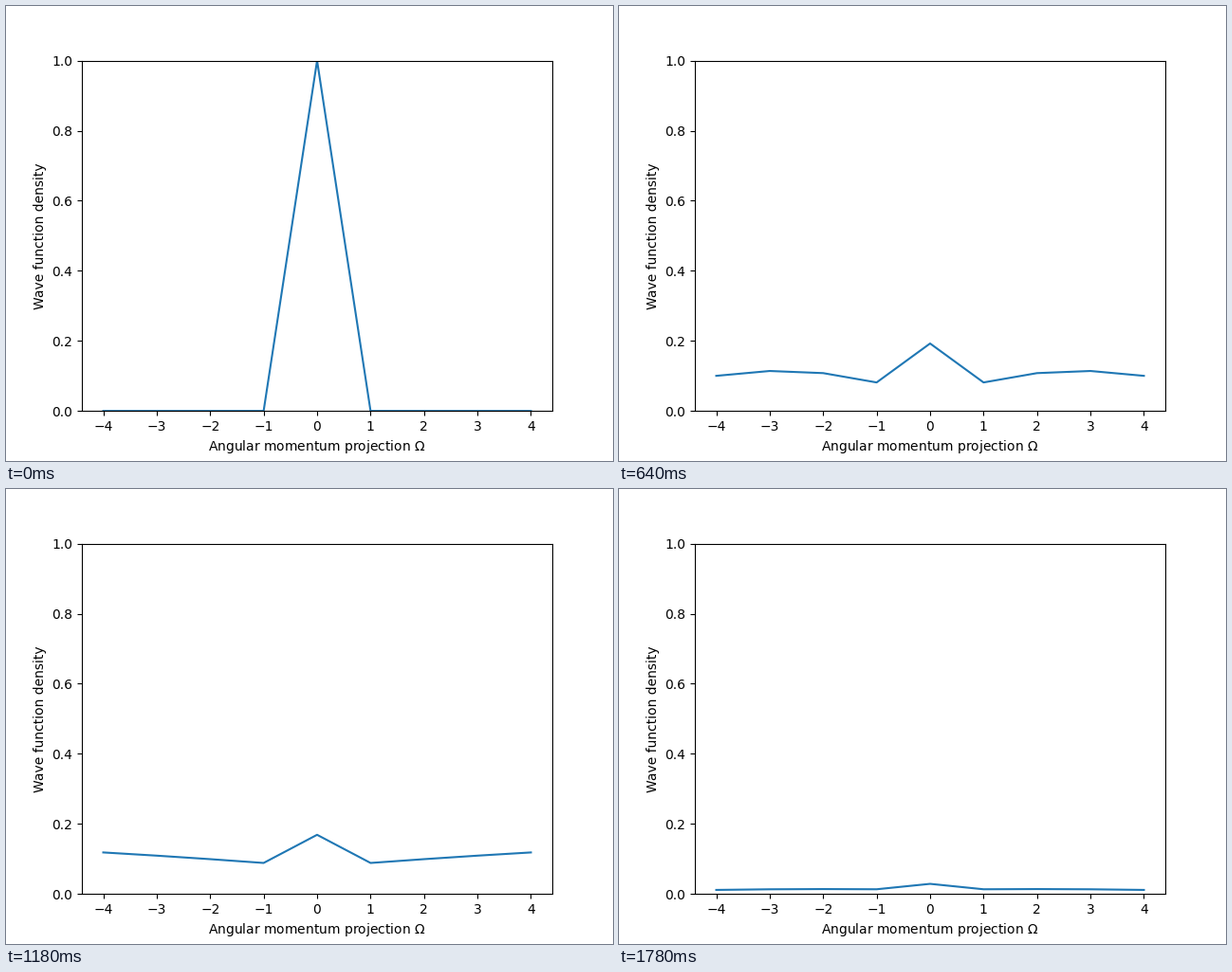
Write a matplotlib script that moves like this. It is 640x480 px and loops after 1.81 s.

```python
import math

import numpy as np
import matplotlib.pyplot as plt
from matplotlib.animation import FuncAnimation

TICK, LOOP = 10, 1810      # ms
HOLD, STEP = 130, 30       # first pose, then a steady step

k = np.arange(1, 5)        # |omega| of the side states
x = k - 2.5
delay = 13.2 - 0.78 * (4.95 - k) ** 2   # outer states fill later


def wave(t, crest, period):
    return math.cos(2 * math.pi * (t - crest) / period)


def settled(t):
    """Side states as a parabola that tilts and bends over time."""
    # the swing freezes once the packet moves away
    tilt = 0.0009 + 0.0091 * wave(min(t, 1400), 560, 620)
    bend = 0.0035 + 0.0069 * wave(t, 640, 1000) * math.exp((640 - t) / 700)
    mean = 0.0998 + 0.41 * tilt
    return mean + tilt * x - bend * (x ** 2 - 1.25)


def arrival(t):
    return (1 + math.exp((420.4 - t) / 36)) ** -delay


def norm(t):
    """Share of the wave packet that is not yet absorbed."""
    return 0.5 * math.erfc((t - 1671) / (98 * math.sqrt(2)))


def density(t):
    side = settled(t) * arrival(t)
    centre = 1 - 2 * side.sum()
    return norm(t) * np.concatenate([side[::-1], [centre], side])


fig, ax = plt.subplots(figsize=(6.4, 4.8), dpi=100)
omega = np.arange(-4, 5)
line, = ax.plot(omega, density(0))
ax.set_ylim(0, 1)
ax.set_xlabel(r"Angular momentum projection $\Omega$")
ax.set_ylabel("Wave function density")


def update(i):
    ms = i * TICK
    t = 0 if ms < HOLD else ms - (ms - HOLD) % STEP
    line.set_ydata(density(t))
    return line,


anim = FuncAnimation(fig, update, frames=LOOP // TICK, interval=TICK,
                     repeat=True, repeat_delay=0)
plt.show()
```
